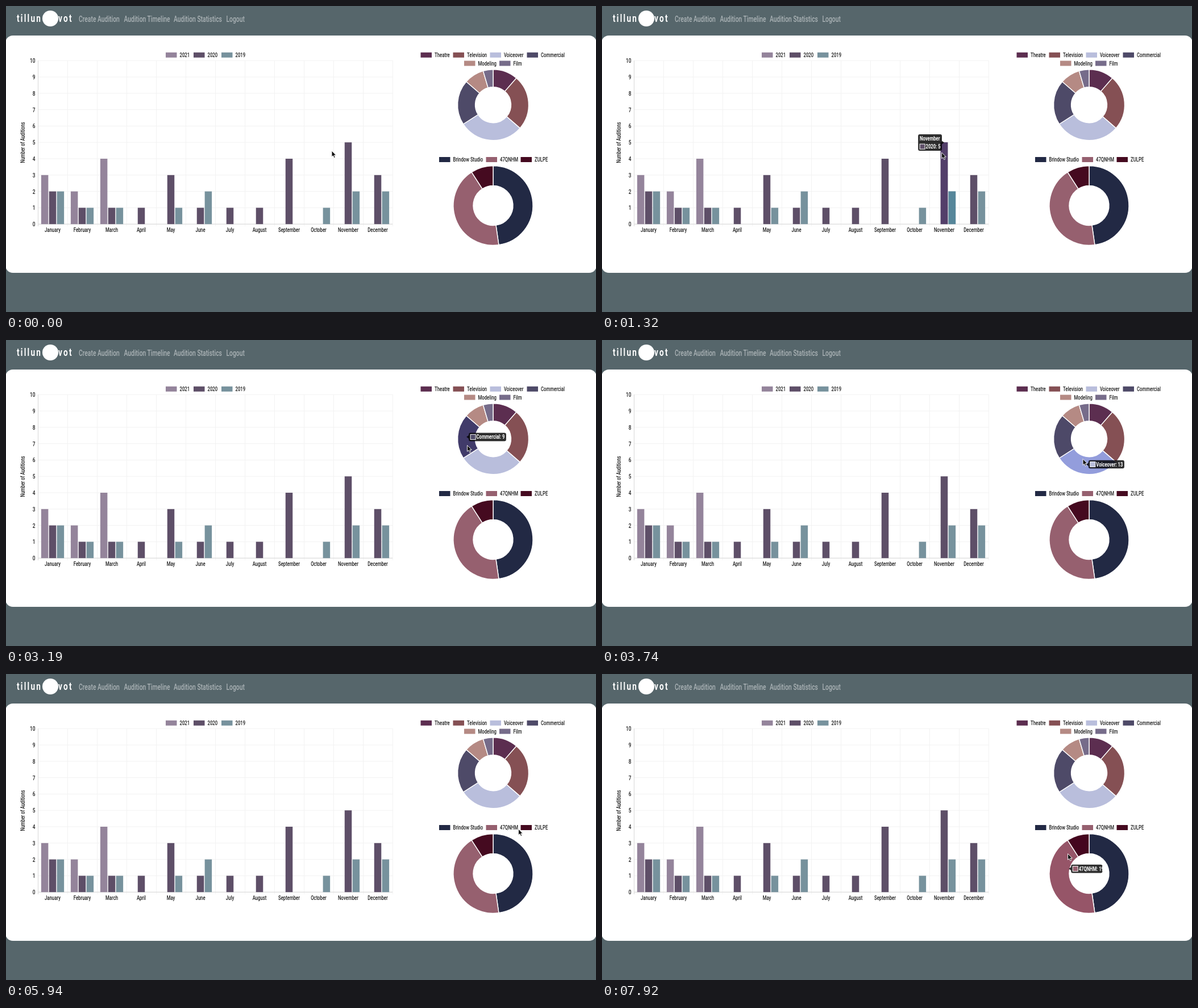
An HTML page that plays this animation: 1038x539 px, repeating every 8000 ms.

```html
<!DOCTYPE html>
<html lang="en">
<head>
<meta charset="utf-8">
<title>Audition Statistics</title>
<style>
  html, body { margin: 0; width: 100%; height: 100%; overflow: hidden; background: #56666b; }
  svg { display: block; width: 100vw; height: 100vh; }
  text { font-family: Roboto, "Liberation Sans", sans-serif; font-weight: 500; white-space: pre; }
</style>
</head>
<body>
<svg id="stage" viewBox="0 0 1038 539"></svg>
<script>
const LOOP = 8000, STEP = 110, FADE = 400;
const CONDENSE = 0.74; // one condensed look for all type
const stage = document.getElementById('stage');

function el(tag, attrs, parent = stage) {
  const node = document.createElementNS('http://www.w3.org/2000/svg', tag);
  for (const key in attrs) node.setAttribute(key, attrs[key]);
  parent.appendChild(node);
  return node;
}

function label(str, x, y, opt = {}) {
  const { size = 10.5, anchor = 'start', fill = '#1d1d1d', weight = 500, spacing = 0, turn = 0, parent = stage } = opt;
  const node = el('text', {
    transform: `translate(${x} ${y}) rotate(${turn}) scale(${CONDENSE} 1)`,
    'font-size': size, 'text-anchor': anchor, fill, 'letter-spacing': spacing
  }, parent);
  node.style.fontWeight = weight;
  node.textContent = str;
  return node;
}

function legend(y, items) {
  for (const [name, color, x] of items) {
    el('rect', { x, y: y - 4.5, width: 19.5, height: 9, fill: color });
    label(name, x + 24.5, y + 3.8);
  }
}

// Header
const brand = { size: 18.5, weight: 700, spacing: 3, fill: '#fff' };
label('tillun', 19, 28, brand);
el('circle', { cx: 78, cy: 22, r: 14, fill: '#fff' });
label('vot', 92, 28, brand);
[['Create Audition', 128], ['Audition Timeline', 207.5], ['Audition Statistics', 295], ['Logout', 387.5]]
  .forEach(([name, x]) => label(name, x, 28.4, { size: 14, fill: '#abb3b6' }));
el('rect', { x: -1, y: 52, width: 1040, height: 418, rx: 13, fill: '#fff' });

// Bar chart
const LEFT = 56, TOP = 96.2, BASE = 384.2, COL = 52, UNIT = 28.8;
const months = ['January', 'February', 'March', 'April', 'May', 'June', 'July',
  'August', 'September', 'October', 'November', 'December'];
const series = [
  { name: '2021', color: '#94849b', hover: '#8b6f99', data: [3, 2, 4] },
  { name: '2020', color: '#5e4f68', hover: '#533f6a', data: [2, 1, 1, 1, 3, 1, 1, 1, 4, 0, 5, 3] },
  { name: '2019', color: '#77929d', hover: '#56869a', data: [2, 1, 1, 0, 1, 2, 0, 0, 0, 1, 2, 2] }
];
const line = (x1, y1, x2, y2, stroke) => el('line', { x1, y1, x2, y2, stroke, 'stroke-width': 1 });

for (let i = 0; i <= 10; i++) {
  const y = BASE - i * UNIT;
  line(LEFT, y, 680, y, '#f2f2f2');
  label(i, 51.5, y + 4, { size: 11.2, anchor: 'end' });
}
for (let i = 0; i <= 12; i++) line(LEFT + i * COL + .5, TOP, LEFT + i * COL + .5, 388, '#f2f2f2');
line(LEFT + .5, TOP, LEFT + .5, 388, '#d8d8d8');
line(LEFT, BASE, 680, BASE, '#d8d8d8');
months.forEach((m, i) => label(m, LEFT + COL * (i + .5), 398, { anchor: 'middle' }));
label('Number of Auditions', 32.6, 240.5, { anchor: 'middle', turn: -90 });
legend(86.3, series.map((s, i) => [s.name, s.color, 281 + i * 49]));

const november = [];
series.forEach((s, k) => s.data.forEach((v, i) => {
  if (!v) return;
  const box = { x: LEFT + i * COL + 5.9 + k * 13.87, y: BASE - v * UNIT, width: 12.5, height: v * UNIT };
  el('rect', { ...box, fill: s.color });
  if (i === 10) november.push(el('rect', { ...box, fill: s.hover, opacity: 0 }));
}));

// Doughnuts
function doughnut(cx, cy, outer, inner, slices) {
  const total = slices.reduce((sum, s) => sum + s.value, 0);
  const at = (a, r) => `${cx + r * Math.sin(a)} ${cy - r * Math.cos(a)}`;
  let a = 0;
  return slices.map(({ name, value, color, hover }) => {
    const b = a + value / total * 2 * Math.PI, mid = (a + b) / 2, r = (outer + inner) / 2;
    const big = b - a > Math.PI ? 1 : 0;
    const d = `M${at(a, outer)}A${outer} ${outer} 0 ${big} 1 ${at(b, outer)}L${at(b, inner)}A${inner} ${inner} 0 ${big} 0 ${at(a, inner)}Z`;
    const style = { d, stroke: '#fff', 'stroke-width': 1.4 };
    el('path', { ...style, fill: color });
    const glow = el('path', { ...style, fill: hover, opacity: 0 });
    a = b;
    return {
      text: `${name}: ${value}`, color, glows: [glow],
      x: cx + r * Math.sin(mid), y: cy - r * Math.cos(mid), flip: Math.sin(mid) > 0
    };
  });
}
const slice = (name, value, color, hover) => ({ name, value, color, hover });

const kinds = [
  slice('Theatre', 5, '#5c2e50', '#54194a'),
  slice('Television', 11, '#855054', '#853840'),
  slice('Voiceover', 13, '#b9bedc', '#929cdd'),
  slice('Commercial', 9, '#4e4a68', '#413b6a'),
  slice('Modeling', 4, '#b58a84', '#b56c62'),
  slice('Film', 2, '#766c8a', '#67568c')
];
const agents = [
  slice('Brindow Studio', 21, '#222944', '#172149'),
  slice('47QNHM', 19, '#96606f', '#964f65'),
  slice('ZULPE', 4, '#450a20', '#43001b')
];
const place = (list, xs) => list.map((s, i) => [s.name, s.color, xs[i]]);
legend(86.3, place(kinds.slice(0, 4), [729.5, 786.5, 851.5, 916.5]));
legend(101, place(kinds.slice(4), [806, 868]));
legend(270.5, place(agents, [762, 844.5, 905.5]));
const kindTips = doughnut(857, 174.2, 62.5, 31.5, kinds);
const agentTips = doughnut(857, 351.5, 70, 35, agents);
const barTips = [{
  title: 'November', text: '2020: 5', color: '#5e4f68', glows: november, x: 602, y: 240.4, flip: true
}];

// Tooltips
const CARET = 4;
function tooltip(items, events) {
  const g = el('g', { opacity: 0 });
  const back = el('path', { fill: '#000', 'fill-opacity': .82 }, g);
  const type = { weight: 700, fill: '#fff', size: 10.3, parent: g };
  const title = label('', 0, 0, type), text = label('', 0, 0, type);
  const swatch = el('rect', { width: 9, height: 9, stroke: '#fff', 'stroke-width': 1 }, g);
  const move = (node, x, y) => node.setAttribute('transform', `translate(${x} ${y}) scale(${CONDENSE} 1)`);

  for (const item of items) {
    text.textContent = item.text;
    const w = text.getComputedTextLength() * CONDENSE + 16, h = item.title ? 29 : 14.6;
    item.box = [item.flip ? item.x - CARET - w : item.x + CARET, item.y - h / 2, w, h];
  }

  return t => {
    let k = -1;
    while (k + 1 < events.length && events[k + 1][0] <= t) k++;
    const now = k < 0 ? null : items[events[k][1]];
    const before = k < 1 ? null : items[events[k - 1][1]];
    const p = k < 0 ? 1 : 1 - (1 - Math.min(1, (t - events[k][0]) / FADE)) ** 4;
    for (const item of items) {
      const glow = item === now ? p : item === before ? 1 - p : 0;
      item.glows.forEach(n => n.setAttribute('opacity', glow));
    }
    const shown = now || before;
    g.setAttribute('opacity', now ? (before ? 1 : p) : before ? 1 - p : 0);
    if (!shown) return;

    const from = (before || shown).box;
    const [x, y, w, h] = shown.box.map((v, i) => from[i] + (v - from[i]) * p);
    const side = shown.flip ? x + w : x, out = shown.flip ? CARET : -CARET, c = y + h / 2;
    back.setAttribute('d',
      `M${x + 3} ${y}h${w - 6}q3 0 3 3v${h - 6}q0 3 -3 3h${6 - w}q-3 0 -3 -3v${6 - h}q0 -3 3 -3z` +
      `M${side} ${c - 3}L${side + out} ${c}L${side} ${c + 3}z`);
    const row = y + h - 7.6;
    title.textContent = shown.title || '';
    text.textContent = shown.text;
    move(title, x + 3, y + 11);
    move(text, x + 13.5, row + 3.9);
    swatch.setAttribute('x', x + 3);
    swatch.setAttribute('y', row - 4.2);
    swatch.setAttribute('fill', shown.color);
  };
}

const tips = [
  tooltip(barTips, [[900, 0], [1560, -1]]),
  tooltip(kindTips, [[2700, 3], [3520, 2], [4400, 1], [5350, -1]]),
  tooltip(agentTips, [[6200, 0], [7570, 2], [7836, 1]])
];

// Pointer: time, x, y
const route = [
  [0, 573, 255], [500, 577, 255], [950, 597, 258], [1320, 597.5, 258], [1560, 603, 254],
  [2000, 680, 212], [2530, 785, 171], [2900, 802, 173], [3200, 812, 186], [3520, 837, 206],
  [3740, 846, 209.5], [4100, 855, 212], [4400, 892, 203], [4620, 896, 185], [5000, 900, 181],
  [5350, 912, 207], [5600, 911, 235], [5940, 901.5, 273], [6250, 900, 300], [6700, 904, 342],
  [7200, 886, 322], [7570, 857, 299], [7836, 825, 302], [7920, 819.5, 316.5], [8000, 817, 324]
];
const pointer = el('path', {
  d: 'M0 0V10.8L2.5 8.6L4.3 12.6L6.2 11.8L4.5 7.9H7.8Z',
  fill: '#111', stroke: '#fff', 'stroke-width': .9, 'stroke-linejoin': 'round'
});

function pointAt(t) {
  let i = 0;
  while (i < route.length - 2 && route[i + 1][0] <= t) i++;
  const a = route[i], b = route[i + 1], prev = route[i - 1] || a, next = route[i + 2] || b;
  const span = b[0] - a[0], u = (t - a[0]) / span;
  return [1, 2].map(n => {
    const m0 = (b[n] - prev[n]) / (b[0] - prev[0]) * span;
    const m1 = (next[n] - a[n]) / (next[0] - a[0]) * span;
    const d = b[n] - a[n];
    return a[n] + u * (m0 + u * (3 * d - 2 * m0 - m1 + u * (m0 + m1 - 2 * d)));
  });
}

const start = performance.now();
function draw(now) {
  const t = Math.floor(Math.max(0, now - start) % LOOP / STEP) * STEP;
  tips.forEach(update => update(t));
  pointer.setAttribute('transform', `translate(${pointAt(t).join(' ')})`);
  requestAnimationFrame(draw);
}
draw(start);
</script>
</body>
</html>
```
